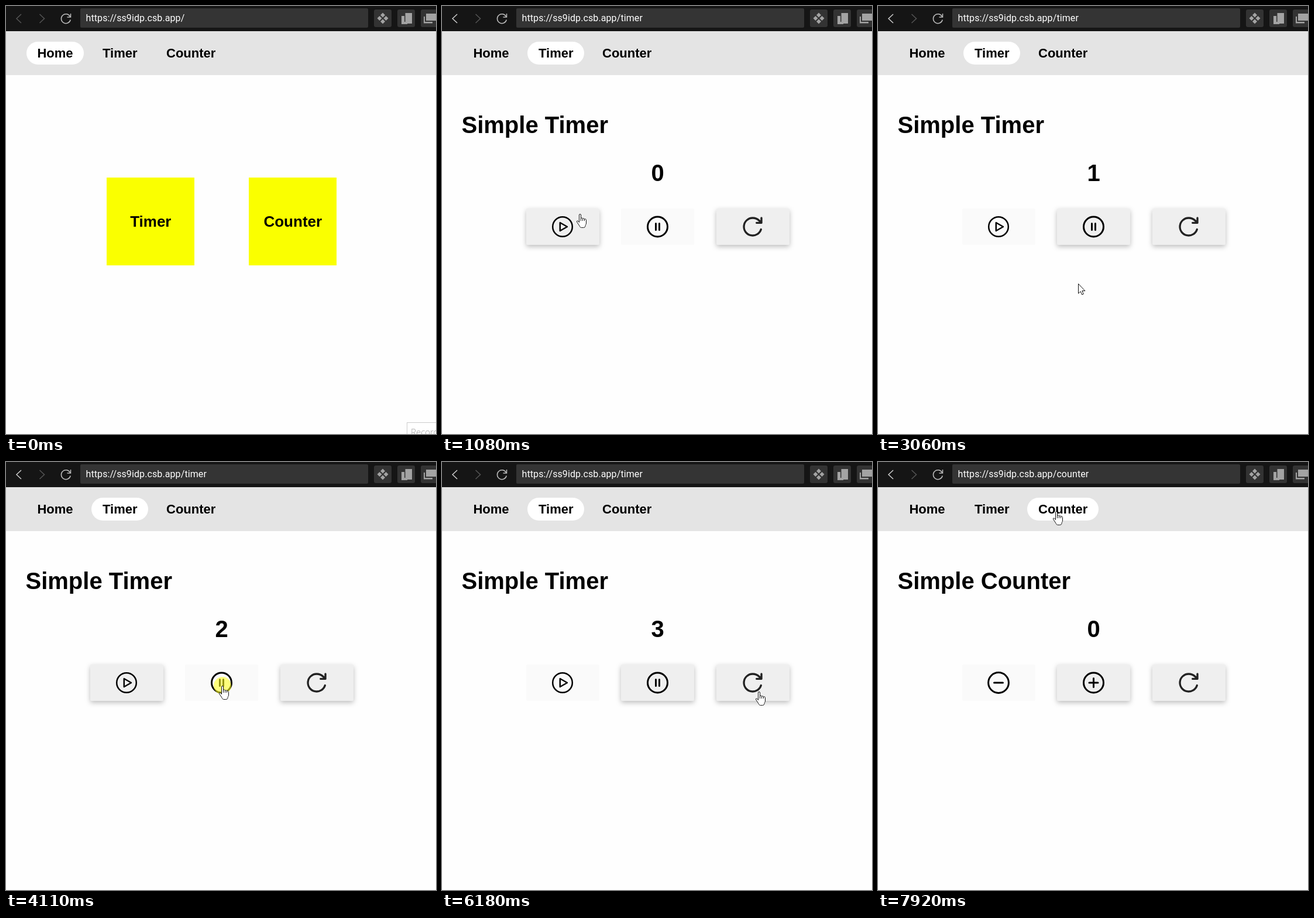
These frames come from a looping animation (735x731 px, 7990 ms). An HTML page:

```html
<!DOCTYPE html>
<html lang="en">
<head>
<meta charset="utf-8">
<title>Timer and counter demo</title>
<style>
  html, body { margin: 0; width: 100%; height: 100%; overflow: hidden; background: #fefefe; }
  svg { display: block; width: 735px; height: 731px; }
  text { font-family: "Liberation Sans", Arial, sans-serif; font-weight: 700; }
  .mid { text-anchor: middle; }
  .line { fill: none; stroke: #000; stroke-width: 3; stroke-linecap: round; stroke-linejoin: round; }
  .thin { stroke-width: 2.5; }
  .nav { font-size: 22px; }
  .big { font-size: 40px; }
  .card { font-size: 26px; }
  .url { font: 400 16px Roboto, sans-serif; letter-spacing: .1px; fill: #fff; }
  .tip { font: 300 15px "Open Sans", sans-serif; fill: #999; }
  .box { fill: #efefef; }
  .box.off { fill: #fafafa; }
  .box:not(.off), .lift { filter: drop-shadow(0 3px 4px rgba(0, 0, 0, .26)); }
</style>
</head>
<body>
<svg viewBox="0 0 735 731">
  <rect width="735" height="731" fill="#fefefe"/>

  <!-- browser bar -->
  <rect width="735" height="43" fill="#151515"/>
  <rect x="127" y="4" width="492" height="33" rx="2" fill="#343434"/>
  <path id="back" d="M26 14l-8 7.5 8 7.5" fill="none" stroke-width="1.5"/>
  <path d="M57.5 14l8 7.5-8 7.5" fill="none" stroke="#555" stroke-width="1.5"/>
  <path d="M109.5 18a8 8 0 1 0 .7 5.500M110.500 13v6h-6" fill="none" stroke="#bbb" stroke-width="1.5"/>
  <text id="url" class="url" x="136.500" y="26"></text>
  <g fill="#333">
    <rect x="629" y="6" width="30" height="30" rx="3"/>
    <rect x="669" y="6" width="30" height="30" rx="3"/>
    <rect x="709" y="6" width="30" height="30" rx="3"/>
  </g>
  <g fill="#a3a3a3">
    <path d="M644 11.500l4 4-4 4-4-4zM644 22.500l4 4-4 4-4-4zM638.500 17l4 4-4 4-4-4zM649.500 17l4 4-4 4-4-4z"/>
    <path d="M676 17h5v10h5v4h-10zM682.500 12h11.500v18h-11.500z"/>
    <path d="M714 18h2v9h13v2.500h-15zM718 13h17v12h-17z"/>
  </g>

  <!-- navigation -->
  <rect y="43" width="735" height="75" fill="#e4e4e4"/>
  <rect id="pill" y="61" height="39" rx="19.5" fill="#fff"/>
  <g class="nav mid">
    <text x="84" y="88">Home</text>
    <text x="194.8" y="88">Timer</text>
    <text x="316.2" y="88">Counter</text>
  </g>

  <g id="home">
    <rect id="card" x="172" y="293" width="150" height="150" fill="#faff00"/>
    <rect x="415" y="293" width="150" height="150" fill="#faff00"/>
    <g class="card mid">
      <text x="247.3" y="377">Timer</text>
      <text x="490.3" y="377">Counter</text>
    </g>
  </g>

  <g id="tool">
    <text id="title" class="big" x="33.5" y="217"></text>
    <text id="count" class="big mid" x="368.5" y="299"></text>
    <rect id="left" class="box" x="144" y="346" width="125" height="62" rx="2"/>
    <rect id="middle" class="box" x="306" y="346" width="125" height="62" rx="2"/>
    <rect class="box" x="469" y="346" width="125" height="62" rx="2"/>
    <g id="timerIcons" class="line">
      <g class="thin">
        <circle cx="206" cy="377" r="16.800"/>
        <path d="M201.800 370v14l12.200-7z"/>
      </g>
      <circle cx="368.500" cy="377" r="17"/>
      <path d="M365.500 371.500v11M371.500 371.500v11"/>
    </g>
    <g id="counterIcons" class="line">
      <circle cx="206" cy="377" r="17.400"/>
      <path d="M198.500 377h15"/>
      <circle cx="368.500" cy="377" r="17"/>
      <path d="M361 377h15M368.500 369.500v15"/>
    </g>
    <path class="line" transform="translate(511 357) scale(1.667)" style="stroke:#222;stroke-width:2"
      d="M20.600 14.700A9 9 0 1 1 12 3c2.500 0 4.900 1 6.700 2.700L21 8M21 3v5h-5"/>
  </g>

  <g id="tip">
    <rect x="685.5" y="711.5" width="70" height="40" fill="#fff" stroke="#ccc"/>
    <text class="tip" x="692" y="733">Recording</text>
  </g>

  <circle id="glow" r="15" fill="#ffff20" opacity=".58"/>
  <path id="arrow" d="M.5.5v16.500l3.700-3.500 2.500 5.500 2.600-1.100-2.400-5.400h5z" fill="#fff" stroke="#111"/>
  <g id="hand" fill="#fff" stroke="#111" stroke-linejoin="round">
    <path d="M-1.500 14.500V2a1.500 1.500 0 0 1 3 0v6c0-1.300 3-1.300 3 .3v.5c0-1.300 3-1.300 3 .3v.6c0-1.200 3-1.200 3 .7v5.600c0 2-1.500 3-1.500 4.500 0 2-1.500 3-3.500 3h-3c-2 0-3-1.500-3.500-3l-4.300-6.500c-1-1.800.7-2.800 2-1.600z"/>
    <path d="M1.500 8v4M4.500 8.500v3.500M7.500 9v3" fill="none"/>
  </g>
</svg>

<script>
const LOOP = 7990, GLOW = 130, DELAY = 110;
const $ = id => document.getElementById(id);

const pages = [
  { url: '', title: '', pill: [35, 98] },
  { url: 'timer', title: 'Simple Timer', pill: [146, 97] },
  { url: 'counter', title: 'Simple Counter', pill: [255, 122] }
];

// each click glows at once and takes effect after DELAY
const clicks = [950, 1720, 4000, 4940, 6350, 7670];
const [open, play, pause, resume, reset, leave] = clicks.map(c => c + DELAY);
const runs = [[play, pause], [resume, reset]];

// pointer moves: start, end, x, y, sag below the straight line
const origin = [655, 726];
const moves = [
  [280, 690, 236, 355, 0],
  [1150, 1630, 227, 376, 0],
  [1830, 2110, 342, 474, 0],
  [3060, 3400, 396, 460, 10],
  [3400, 3760, 370, 382, 0],
  [4320, 4930, 207, 379, 78],
  [5060, 6100, 542, 392, 122],
  [6670, 7710, 305, 84, 215]
];

const show = (id, on) => $(id).style.display = on ? '' : 'none';
const place = (id, x, y) => $(id).setAttribute('transform', `translate(${x} ${y})`);
const clamp = v => Math.min(1, Math.max(0, v));
const ease = k => k * k * (3 - 2 * k);

function pointer(t) {
  let [x, y] = origin;
  for (const [a, b, toX, toY, sag] of moves) {
    const k = ease(clamp((t - a) / (b - a)));
    x += (toX - x) * k;
    y += (toY - y) * k + sag * Math.sin(Math.PI * k);
  }
  return [Math.round(x), Math.round(y)];
}

// whole seconds of every run so far
function seconds(t) {
  if (t >= reset) return 0;
  return runs.reduce((sum, [a, b]) =>
    sum + Math.max(0, Math.floor((Math.min(t, b) - a) / 1000)), 0);
}

function overLink(x, y, page) {
  const hit = (left, top, w, h) => x >= left && x < left + w && y >= top && y < top + h;
  if (pages.some(({ pill: [left, w] }) => hit(left, 61, w, 39))) return true;
  return page
    ? [144, 306, 469].some(left => hit(left, 346, 125, 62))
    : [172, 415].some(left => hit(left, 293, 150, 150));
}

function draw(t) {
  const page = t < open ? 0 : t < leave ? 1 : 2;
  const { url, title, pill } = pages[page];
  const leftOff = page === 2 || runs.some(([a, b]) => t >= a && t < b);

  $('url').textContent = 'https://ss9idp.csb.app/' + url;
  $('back').setAttribute('stroke', page ? '#ccc' : '#555');
  $('pill').setAttribute('x', pill[0]);
  $('pill').setAttribute('width', pill[1]);
  $('title').textContent = title;
  $('count').textContent = seconds(t);
  $('left').classList.toggle('off', leftOff);
  $('middle').classList.toggle('off', !leftOff);
  $('card').classList.toggle('lift', t >= clicks[0]);
  show('home', page === 0);
  show('tool', page > 0);
  show('timerIcons', page === 1);
  show('counterIcons', page === 2);
  show('tip', t < 70);

  const tip = pointer(t);
  const visible = t >= moves[0][0];
  const hot = overLink(...tip, page);
  show('arrow', visible && !hot);
  show('hand', visible && hot);
  show('glow', clicks.some(c => t >= c && t < c + GLOW));
  ['arrow', 'hand', 'glow'].forEach(id => place(id, ...tip));
}

const start = performance.now();
function tick() {
  draw((performance.now() - start) % LOOP);
  requestAnimationFrame(tick);
}
tick();
</script>
</body>
</html>
```
